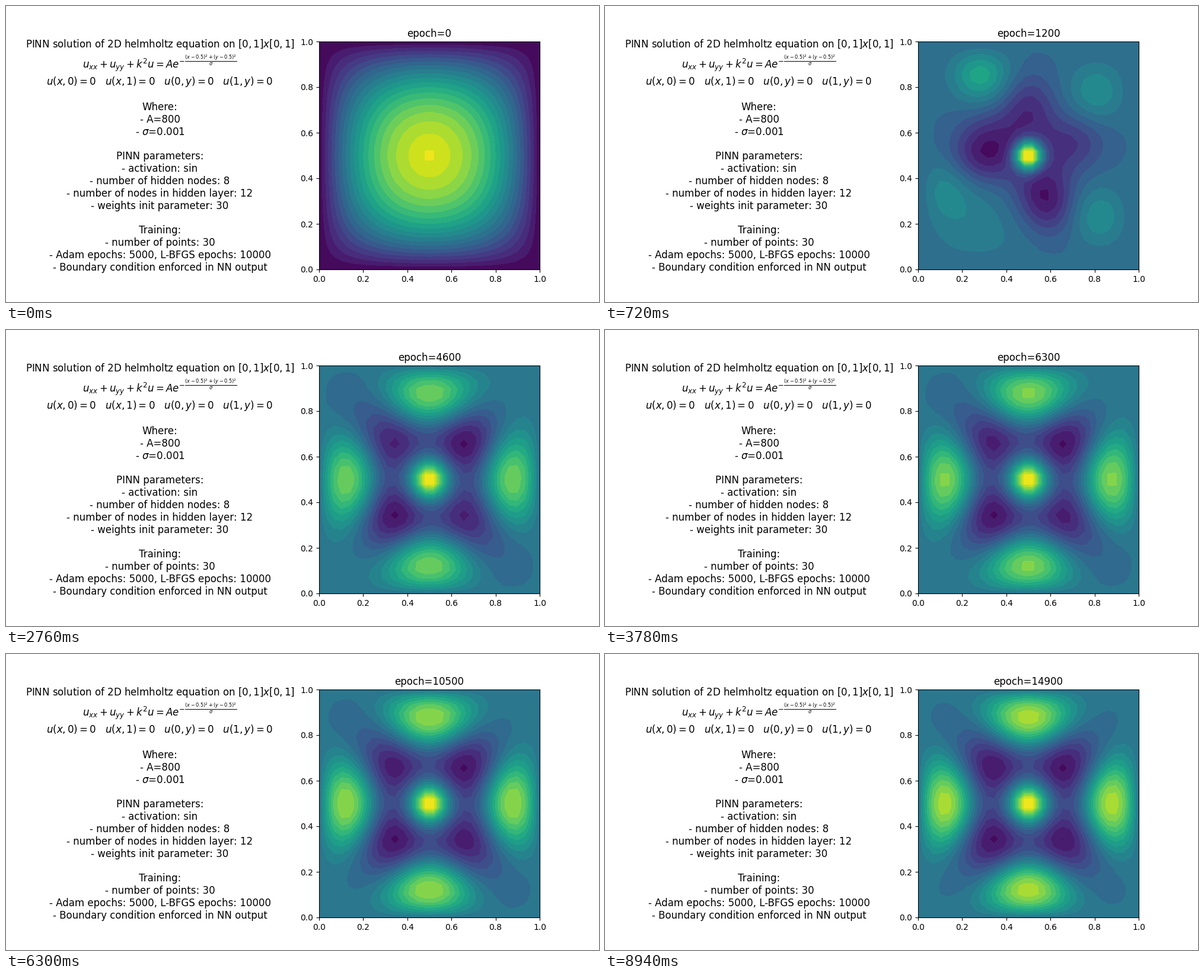
These frames come from a looping animation (1000x500 px, 9000 ms). A matplotlib script:

```python
import numpy as np
import matplotlib.pyplot as plt
from matplotlib.animation import FuncAnimation

FRAMES, INTERVAL = 150, 60
PEAK = 11.5          # height of the centre, in contour steps
N = 30
MID = N // 2

plt.rcParams["font.family"] = "DejaVu Sans"

axis = np.linspace(0, 1, N)
X, Y = np.meshgrid(axis, axis)
R = np.hypot(X - 0.5, Y - 0.5)
EDGE = (np.tanh(12 * X) * np.tanh(12 * (1 - X))
        * np.tanh(12 * Y) * np.tanh(12 * (1 - Y)))
SPIKE = np.exp(-R**2 / 0.0034)

NOTES = "\n".join([
    r"PINN solution of 2D helmholtz equation on $[0,1]x[0,1]$",
    r"$u_{xx}+u_{yy}+k^2u=Ae^{-\frac{(x-0.5)^2+(y-0.5)^2}{\sigma}}$",
    r"$u(x,0)=0$   $u(x,1)=0$   $u(0,y)=0$   $u(1,y)=0$",
    "",
    "Where:",
    "- A=800",
    r"- $\sigma$=0.001",
    "",
    "PINN parameters:",
    "- activation: sin",
    "- number of hidden nodes: 8",
    "- number of nodes in hidden layer: 12",
    "- weights init parameter: 30",
    "",
    "Training:",
    "- number of points: 30",
    "- Adam epochs: 5000, L-BFGS epochs: 10000",
    "- Boundary condition enforced in NN output",
])


def petals(radius, along, across, heights):
    """Gaussian hills around the centre, given as {angle: height}."""
    total = np.zeros_like(X)
    for deg, height in heights.items():
        c, s = np.cos(np.radians(deg)), np.sin(np.radians(deg))
        a = (X - 0.5) * c + (Y - 0.5) * s - radius
        b = (Y - 0.5) * c - (X - 0.5) * s
        total += height * np.exp(-(a / along)**2 / 2 - (b / across)**2 / 2)
    return total * EDGE


def fit(field, low):
    """Scale the hollows down to `low` and lift the centre to PEAK."""
    field = np.where(field < 0, field * low / field.min(), field)
    return field + SPIKE * (PEAK - field[MID, MID]) / SPIKE[MID, MID]


def helmholtz(k=15, sigma=0.001):
    """Sine series for a narrow Gaussian source in the unit square."""
    m = np.arange(1, 26, 2)
    waves = np.sin(np.pi * np.outer(m, axis)) * ((-1.0)**(m // 2))[:, None]
    lam = np.pi**2 * np.add.outer(m**2, m**2)
    return waves.T @ (np.exp(-lam * sigma / 4) / (lam - k * k)) @ waves


SOLUTION = helmholtz()
SOLUTION /= SOLUTION[:, :N // 4].max()
TILT = 8 * np.sin(2 * np.pi * X) * np.sin(2 * np.pi * Y) * (R - 0.35)


def settled(side, tilt):
    return fit(side * SOLUTION + tilt * TILT + 0.25, -6.25)


def flat():
    bowl = 16 * X * (1 - X) * Y * (1 - Y)
    return 18.68 * bowl + 1.37 * np.exp(-R**2 / 0.0005)


def star():
    arms = petals(0.2, 0.11, 0.09, {-68: -5, 180: -4.5, 90: -3.5, 15: -3, 145: -1.5})
    hills = petals(0.42, 0.09, 0.09, {42: 3, 121: 5, 200: 2, 320: 3})
    return fit(arms + hills + petals(0.4, 0.15, 0.2, {228: 1.6}) + 0.1, -5.4)


def pinwheel():
    ring = -5 * np.exp(-((R - 0.165) / 0.07)**2 / 2)
    dents = petals(0.17, 0.05, 0.08, {145: -1.4, 295: -1.4, 335: -1})
    hills = petals(0.38, 0.075, 0.13, {14: 5, 99: 5, 171: 5, 288: 6})
    return fit(ring + dents + hills + 0.5 * EDGE, -6.4)


KEYS = [
    (0, flat()),
    (1200, star()),
    (2400, pinwheel()),
    (4600, settled(7.5, 0.7)),
    (8300, settled(8.4, 0.5)),
    (14900, settled(9.3, 0.15)),
]


def field_at(epoch):
    for (e0, a), (e1, b) in zip(KEYS, KEYS[1:]):
        if epoch <= e1:
            t = (epoch - e0) / (e1 - e0)
            if e0 == 0:
                t = 1 - (1 - t)**2
            return a + (b - a) * t


fig = plt.figure(figsize=(10, 5), dpi=100, facecolor="white")
fig.text(0.2595, 0.495, NOTES, fontsize=12, ha="center", va="center")
ax = fig.add_axes([0.528, 0.11, 0.372, 0.77])


def update(i):
    for old in list(ax.collections):
        old.remove()
    u = field_at(100 * i)
    levels = np.arange(np.floor(u.min()), np.ceil(u.max()) + 1)
    ax.contourf(X, Y, u, levels=levels, cmap="viridis")
    ax.set_xlim(0, 1)
    ax.set_ylim(0, 1)
    ax.set_title(f"epoch={100 * i}")
    return []


anim = FuncAnimation(fig, update, frames=FRAMES, interval=INTERVAL,
                     init_func=lambda: update(0), repeat=True, repeat_delay=0)
plt.show()
```
